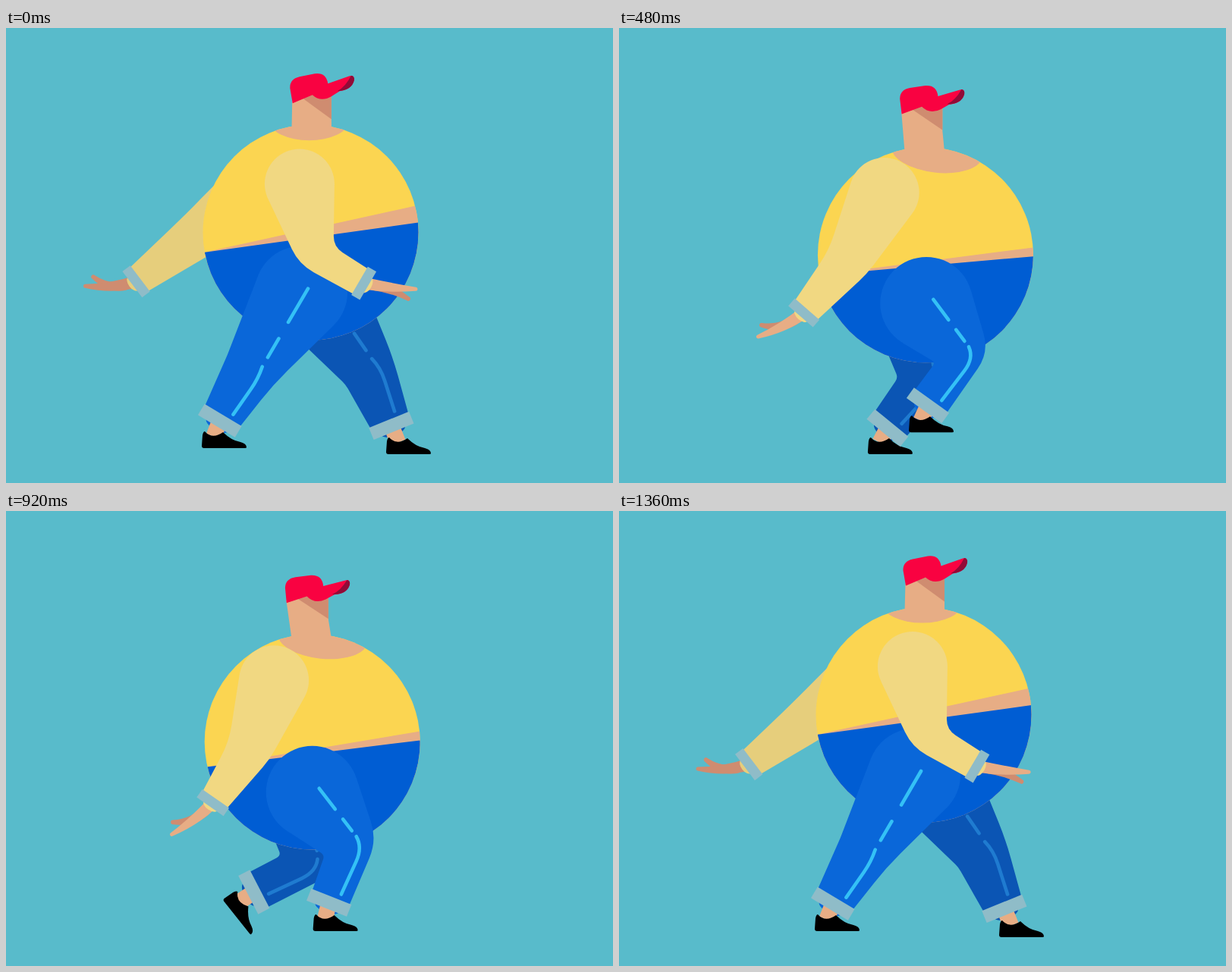
Recreate the animation shown at these times as an HTML page. Size 800 by 600 pixels, loop 1400 ms.

```html
<!DOCTYPE html>
<html lang="en">
<head>
<meta charset="utf-8">
<title>Walk cycle</title>
<style>
html, body { margin: 0; width: 100%; height: 100%; overflow: hidden; background: #58bbcb; }
svg { display: block; width: 100vw; height: 100vh; }
</style>
</head>
<body>
<svg id="stage" viewBox="0 0 800 600"></svg>
<script>
const LOOP = 1400, HALF = LOOP / 2, STRIDE = 660, STEP = 40, BODY_R = 142;
const SKIN = '#e7ad85', SHADE = '#cf8c70', CUFF = '#8fbcc8';

const { PI, sin, cos, hypot, atan2, min } = Math;
const rad = a => a * PI / 180;
const lerp = (a, b, k) => a + (b - a) * k;

// Motion rules: a swing over the whole loop, a bounce on every step
const swing = t => cos(2 * PI * (t + 20) / LOOP);
const bounce = t => 27.5 * sin(PI * (t + 35) / HALF) ** 2;

// Each foot swings forward in the first half and slides back in the second
function footPose(t, { mid, reach, floor }) {
  const u = min(1, t % HALF / STRIDE), lifted = t < HALF;
  const forward = lifted ? u ** 1.8 : 1 - u;
  const toe = min(1, (u / 0.7) ** 0.6);
  return {
    at: [mid + reach * (2 * forward - 1), floor - (lifted ? 32 * sin(PI * u ** 0.8) : 0)],
    turn: lifted ? 57 * sin(PI * toe) : 0,
    cuff: lifted ? lerp(31, -22, u) + 57 * sin(PI * u) : lerp(-22, 31, u) + 30 * sin(PI * u)
  };
}

function legPose(t, gait) {
  const foot = footPose(t, gait);
  const hip = [399 - 10 * swing(t), 348 + bounce(t)];
  const end = polar(foot.at, 19, foot.cuff - 90);
  const knee = polar(end, 78, foot.cuff - 90);
  const bend = lerp(heading(hip, knee) - 90, foot.cuff, 0.33);
  return { foot, root: hip, joint: knee, bend, end, turn: foot.cuff };
}

function armPose(t) {
  const c = swing(t), b = bounce(t);
  const shoulder = [364 + 23 * c, 205 + 0.8 * b];
  const reach = 185 - 28.5 * c - 0.8 * b;
  const aim = 95 - 43 * c + 5 * c * c;
  const fore = aim - 13.5 * (1 + c) + 20 * (1 - c * c);
  const end = polar(shoulder, reach, aim);
  const elbow = polar(end, -0.465 * reach, fore);
  const bend = lerp(heading(shoulder, elbow), fore, 0.3) - 90;
  return { c, fore, root: shoulder, joint: elbow, bend, end, turn: fore - 90 };
}

const polar = (p, r, deg) => [p[0] + r * cos(rad(deg)), p[1] + r * sin(rad(deg))];
const heading = (p, q) => atan2(q[1] - p[1], q[0] - p[0]) * 180 / PI;
const dist = (p, q) => hypot(q[0] - p[0], q[1] - p[1]);
const mix = (p, q, k) => [lerp(p[0], q[0], k), lerp(p[1], q[1], k)];
// Point in a turned frame: along its axis, then up from it
const local = (p, deg, along, up) => polar(polar(p, along, deg), up, deg - 90);
const xy = p => p[0].toFixed(2) + ' ' + p[1].toFixed(2);
const place = (p, deg = 0) => `translate(${xy(p)}) rotate(${deg})`;

function tangent(c, r, p, side) {
  const open = Math.acos(min(1, r / dist(c, p))) * 180 / PI;
  return polar(c, r, heading(c, p) + side * open);
}

function corner(a, p, b, r) {
  const near = q => mix(p, q, min(0.45, r / dist(p, q)));
  return `L${xy(near(a))} Q${xy(p)} ${xy(near(b))}`;
}

// Round root, two bent edges, flat end at the cuff
function limbPath({ root, joint, bend, end, turn }, r, jointHalf, endHalf, softRear, softFront) {
  const rear = polar(joint, -jointHalf, bend), front = polar(joint, jointHalf, bend);
  const endRear = polar(end, -endHalf, turn), endFront = polar(end, endHalf, turn);
  const topRear = tangent(root, r, rear, 1), topFront = tangent(root, r, front, -1);
  return `M${xy(topRear)} ${corner(topRear, rear, endRear, softRear)} L${xy(endRear)} L${xy(endFront)} ` +
    `${corner(endFront, front, topFront, softFront)} L${xy(topFront)}Z ` +
    `M${xy([root[0] + r, root[1]])} a${r} ${r} 0 1 0 ${-2 * r} 0 a${r} ${r} 0 1 0 ${2 * r} 0Z`;
}

function seamPath({ root, joint, bend, end, turn }) {
  const top = [root[0] + 9, root[1] - 5], knee = local(joint, bend, 11, 12);
  const curve = local(joint, bend, 15, -4), hem = local(end, turn, 11, 16);
  const on = k => xy(mix(top, knee, k));
  return `M${xy(top)} L${on(0.43)} M${on(0.64)} L${on(0.88)} ` +
    `M${xy(knee)} Q${xy(curve)} ${xy(mix(curve, hem, 0.3))} L${xy(hem)}`;
}

// Tapered finger through three points
function fingerPath(a, b, c, wa, wb, wc) {
  const side = s => [
    polar(a, s * wa, heading(a, b) + 90), polar(b, s * wb, heading(a, c) + 90), polar(c, s * wc, heading(b, c) + 90)
  ];
  const [a1, b1, c1] = side(1), [a2, b2, c2] = side(-1);
  return `M${xy(a1)} Q${xy(b1)} ${xy(c1)} A${wc} ${wc} 0 0 0 ${xy(c2)} Q${xy(b2)} ${xy(a2)}Z`;
}

const stage = document.getElementById('stage');
function set(node, attrs) {
  for (const k in attrs) node.setAttribute(k, attrs[k]);
}
function el(tag, attrs = {}, parent = stage) {
  const node = document.createElementNS('http://www.w3.org/2000/svg', tag);
  set(node, attrs);
  return parent.appendChild(node);
}

const SHOE = 'M-10 -2 Q0 9 14 -1 Q25 10 37 12 Q45 14 45 19 Q45 20 43 20 L-11 20 Q-14 20 -14 17 L-13 3 Q-12 -2 -10 -2Z';

function makeLeg(lead, gait, fill, seamColor) {
  const limb = el('path', { fill });
  const seam = el('path', { fill: 'none', stroke: seamColor, 'stroke-width': 4.6, 'stroke-linecap': 'round' });
  const sock = el('ellipse', { cy: 6, rx: 17, ry: 8, fill });
  const ankle = el('line', { stroke: SKIN, 'stroke-width': 21 });
  const shoe = el('path', { d: SHOE });
  const cuff = el('rect', { x: -28.5, y: -8.5, width: 57, height: 17, fill: CUFF });
  return t => {
    const pose = legPose((t + lead) % LOOP, gait), { foot, end } = pose;
    const transform = place(end, pose.turn), sole = polar(foot.at, 5, foot.turn + 70);
    set(limb, { d: limbPath(pose, 61, 36, 26, 6, 26) });
    set(seam, { d: seamPath(pose) });
    set(sock, { transform });
    set(ankle, { x1: end[0], y1: end[1], x2: sole[0], y2: sole[1] });
    set(shoe, { transform: place(foot.at, foot.turn) });
    set(cuff, { transform });
  };
}

function makeArm(lead, fill, handColor) {
  const limb = el('path', { fill });
  const short = el('path', { fill: SHADE });
  const long = el('path', { fill: handColor });
  const lining = el('ellipse', { cy: 5, rx: 11, ry: 6, fill });
  const cuff = el('rect', { x: -21.5, y: -6.5, width: 43, height: 13, fill: CUFF });
  return t => {
    const pose = armPose((t + lead) % LOOP), { c, fore, end } = pose;
    const knuckle = polar(end, 34, fore - 20 * c);
    const point = fore + 8 - 36 * c;
    const transform = place(end, pose.turn);
    set(limb, { d: limbPath(pose, 46, 28 - 2.5 * c, 19, 22, 14) });
    set(long, { d: fingerPath(end, knuckle, polar(knuckle, 35, point), 8, 7, 2.5) });
    set(short, {
      d: fingerPath(mix(end, knuckle, 0.45), mix(end, knuckle, 1.1), polar(knuckle, 29, point + 27), 7, 6, 2.8)
    });
    set(lining, { transform });
    set(cuff, { transform });
  };
}

const bodyY = t => 279.5 - 10.5 * swing(t) + 0.88 * bounce(t);

function makeBody() {
  const clip = el('clipPath', { id: 'belly' }, el('defs'));
  el('circle', { r: BODY_R }, clip);
  const spot = el('g');
  const inside = el('g', { 'clip-path': 'url(#belly)' }, spot);
  el('rect', { x: -150, y: -150, width: 300, height: 200, fill: '#fbd551' }, inside);
  const collar = el('ellipse', { fill: SKIN }, inside);
  const skin = el('path', { fill: SKIN }, inside);
  const trousers = el('path', { fill: '#005dd3' }, inside);
  const below = (left, right) => `M-141 ${left} L142 ${right} L150 160 L-150 160 L-150 ${left}Z`;
  return t => {
    const c = swing(t), b = bounce(t), left = 20 + 6 * c + 0.7 * b;
    set(spot, { transform: place([403 - 1.5 * c, bodyY(t)]) });
    set(collar, {
      rx: 57 - 5 * c, ry: 26.5 - 1.5 * c,
      transform: place([8.5 - 10.5 * c, -140 - 6.5 * c], 4 - 4 * c)
    });
    set(skin, { d: below(left, -18 - 18 * c - 0.2 * b) });
    set(trousers, { d: below(left, -1 - 12 * c - 0.3 * b) });
  };
}

function makeHead() {
  const neck = el('path', { fill: SKIN });
  const shade = el('path', { fill: SHADE });
  const cap = el('g');
  el('path', {
    fill: '#f90241',
    d: 'M0 0 L-3.5 -20 Q-4 -32 9 -35 L29 -39 Q44 -41 46.5 -26 L75 -36 Q81 -38 81 -31 Q78 -18 62 -16 L51 -9 Q37 -1 26 -11Z'
  }, cap);
  el('path', { fill: '#910b38', d: 'M77 -36.5 Q82 -36 81 -30 Q78 -17 59 -16 Q70 -22 77 -36.5Z' }, cap);
  return t => {
    const b = bounce(t), x = 378 - 0.36 * b, y = 98.5 + b;
    const base = bodyY(t) - 136, right = 429 - 0.18 * b;
    set(neck, { d: `M${x - 0.5} ${y - 4} L${right} ${y - 14} V${y + 22} L429 ${base} V${base + 8} H376.5 V${base}Z` });
    set(shade, { d: `M${x + 14} ${y - 6} L${right} ${y + 21} V${y - 14} H${x + 30}Z` });
    set(cap, { transform: place([x, y], 0.2 * b) });
  };
}

el('rect', { width: 800, height: 600, fill: '#58bbcb' });
const parts = [
  makeArm(HALF, '#e6ce7c', SHADE),
  makeLeg(HALF, { mid: 396, reach: 119, floor: 542 }, '#0b55b4', '#1f7bd0'),
  makeBody(),
  makeHead(),
  makeLeg(0, { mid: 382, reach: 110, floor: 534 }, '#0a67d9', '#34c1f6'),
  makeArm(0, '#f1d882', SKIN)
];

const start = performance.now();
function frame() {
  const t = Math.floor((performance.now() - start) % LOOP / STEP) * STEP;
  for (const draw of parts) draw(t);
  requestAnimationFrame(frame);
}
frame();
</script>
</body>
</html>
```
